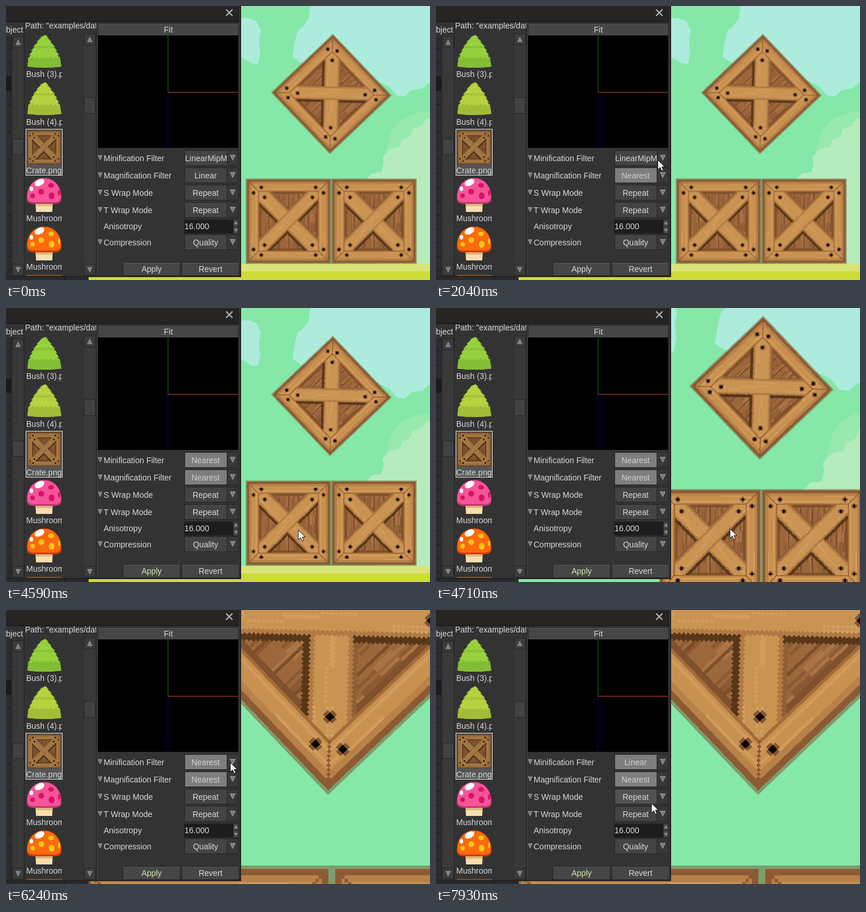
Recreate the animation shown at these times as an HTML page with a canvas. Size 734 by 475 pixels, loop 8000 ms.

```html
<!DOCTYPE html>
<html lang="en">
<head>
<meta charset="utf-8">
<title>Texture filter panel</title>
<style>
html, body { margin: 0; width: 100%; height: 100%; overflow: hidden; background: #222; }
canvas, svg.layer { position: absolute; left: 0; top: 0; display: block; }
#thumb { left: 36px; top: 215px; filter: brightness(.8); }
text { font: 14px "Liberation Sans", Arial, sans-serif; fill: #d8d8d8; }
.mid { text-anchor: middle; }
.off { display: none; }
</style>
</head>
<body>
<canvas id="scene" width="734" height="475"></canvas>
<svg class="layer" id="panel" width="734" height="475"></svg>
<canvas id="thumb" width="60" height="60"></canvas>
<svg class="layer" id="top" width="734" height="475"></svg>
<script>
const LOOP = 8000;
const $ = id => document.getElementById(id);

// ---------- small drawing helpers ----------
const rect = (x, y, w, h, fill, extra = '') =>
  `<rect x="${x}" y="${y}" width="${w}" height="${h}" fill="${fill}" ${extra}/>`;
const box = (x, y, w, h, fill, extra = '') =>
  rect(x + .5, y + .5, w - 1, h - 1, fill, `stroke="#262626" ${extra}`);
const text = (x, cy, s, extra = '') => `<text x="${x}" y="${cy + 5}" ${extra}>${s}</text>`;
const label = (x, cy, w, s) =>
  `<svg x="${x}" y="${cy - 10}" width="${w}" height="20">${text(0, 10, s)}</svg>`;
const arrow = (x, y, w, h, up) => {
  const s = up ? -1 : 1;
  return `<path d="M${x - w} ${y - h * s}h${2 * w}L${x} ${y + h * s}z" fill="#7c7c7c" stroke="#a8a8a8" stroke-width=".8"/>`;
};
const button = (x, y, w, h, s, id) =>
  box(x, y, w, h, '#464646') + rect(x + 1, y + 1, w - 2, 1, '#565656') +
  text(x + w / 2, y + h / 2, s, `class="mid" id="${id}"`);
const ellipse = (x, y, rx, ry, fill) =>
  `<ellipse cx="${x}" cy="${y}" rx="${rx}" ry="${ry}" fill="${fill}"/>`;

function scrollbar(x, y0, y1, thumbY, thumbH) {
  return rect(x, y0, 20, y1 - y0, '#393939') +
    box(x, y0, 20, 20, '#3c3c3c') + arrow(x + 10, y0 + 10, 4, 4, true) +
    box(x, y1 - 20, 20, 20, '#3c3c3c') + arrow(x + 10, y1 - 10, 4, 4) +
    box(x, thumbY, 20, thumbH, '#414141');
}

// a leafy dome with a darker, ragged lower layer
function bush(y, light, dark) {
  const left = [], right = [];
  for (let i = 0; i <= 6; i++) {
    const w = 8 + 21 * Math.sin(i * Math.PI / 12), py = y + 5 + i * 7.6;
    left.push(`L${66 - w} ${py}l3 -.5`);
    right.unshift(`L${63 + w} ${py - .5}l3 .5`);
  }
  const base = `L37 ${y + 55}Q66 ${y + 59} 96 ${y + 55}`;
  const rag = (cy, w) => {
    let d = `M${66 - w} ${cy}`;
    for (let i = 0; i < 7; i++) d += `l${w / 7} ${3 + i % 2}l${w / 7} ${-3 - (i + 1) % 2}`;
    return d;
  };
  return `<path d="M68 ${y}l-4 2${left.join('')}${base}${right.join('')}z" fill="${light}"/>` +
    `<path d="${rag(y + 38, 27)}L96 ${y + 55}Q66 ${y + 59} 37 ${y + 55}z" fill="${dark}"/>` +
    `<path d="${rag(y + 20, 18)}" fill="none" stroke="${dark}" stroke-width="1.5"/>`;
}

function mushroom(y, cap, spot, rim) {
  return `<path d="M51 ${y + 42}h30l-1 17h-28z" fill="#f6dfae"/>` +
    `<path d="M51 ${y + 44}h30l-1 5h-28z" fill="#dcb77c"/>` +
    `<path d="M36 ${y + 34}C36 ${y + 13} 50 ${y} 66 ${y}S96 ${y + 13} 96 ${y + 34}Q97 ${y + 45} 84 ${y + 45}H48Q35 ${y + 45} 36 ${y + 34}z" fill="${rim}"/>` +
    `<path d="M37 ${y + 33}C37 ${y + 13} 50 ${y + 1} 66 ${y + 1}S95 ${y + 13} 95 ${y + 33}Q95 ${y + 42} 84 ${y + 42}H48Q37 ${y + 42} 37 ${y + 33}z" fill="${cap}"/>` +
    ellipse(78, y + 13, 5, 4, spot) + ellipse(61, y + 24, 5, 5, spot) + ellipse(79, y + 31, 5, 6, spot) +
    ellipse(46, y + 31, 4, 4, spot) + ellipse(92, y + 26, 2, 5, spot) +
    `<ellipse cx="58" cy="${y + 8}" rx="9" ry="5.5" fill="#fff" transform="rotate(-28 58 ${y + 8})"/>` +
    ellipse(44, y + 19, 3, 4, '#fff');
}

// ---------- panel ----------
const rows = [
  ['Minification Filter', 264, 'LinearMipMapLinear', 'min'],
  ['Magnification Filter', 294, 'Linear', 'mag'],
  ['S Wrap Mode', 324, 'Repeat', 'wrapS'],
  ['T Wrap Mode', 354, 'Repeat', 'wrapT'],
  ['Compression', 410, 'Quality', 'comp']
];

function buildPanel() {
  let s = rect(0, 0, 407, 470, '#333') + rect(0, 0, 407, 27, '#262523') + rect(0, 26, 407, 2, '#1d1d1d') +
    '<path d="M381 6l11 11M392 6l-11 11" stroke="#b4b4b4" stroke-width="2.2"/>';

  // cropped list on the left edge
  s += rect(0, 52, 10, 417, '#2d2d2d') + rect(0, 122, 10, 24, '#1b1b1b');
  for (let y = 74; y < 468; y += 24) s += rect(0, y, 10, 1, '#1a1a1a');
  s += rect(9, 52, 1, 417, '#1f1f1f') + label(0, 41, 30, 'bject') + scrollbar(11, 53, 467, 230, 28);
  s += rect(31, 28, 1, 441, '#222');

  // asset list
  s += label(33, 34, 124, 'Path: "examples/data/') + scrollbar(135, 48, 467, 158, 29);
  s += bush(50, '#96d03c', '#82bd36') + label(35, 118, 62, 'Bush (3).png');
  s += bush(132, '#b6d23f', '#a2bd38') + label(35, 201, 62, 'Bush (4).png');
  s += rect(34.5, 213.5, 63, 80, '#555', 'stroke="#dcdcdc"') + label(35, 285, 62, 'Crate.png');
  s += mushroom(298, '#f5549a', '#d81260', '#c2386f') + label(35, 368, 62, 'Mushroom_1.png');
  s += mushroom(382, '#fb6a0c', '#fbc41c', '#d03c08') + label(35, 452, 62, 'Mushroom_2.png');
  s += rect(36, 466, 61, 3, '#7d512c');

  // preview
  s += rect(156, 28, 1, 441, '#1f1f1f') + rect(157, 28, 2, 441, '#3d3d3d');
  s += button(159, 30, 244, 22, 'Fit', 'fit') + rect(159, 51, 243, 195, '#000') +
    rect(280, 51, 1, 98, '#0a7a0a') + rect(280, 150, 1, 96, '#00007c') + rect(280, 149, 122, 1, '#c04030');

  // properties
  for (const [name, cy, value, id] of rows) {
    s += arrow(163, cy - 1, 3.5, 4) + label(169, cy, name === 'Compression' ? 82 : 130, name);
    s += box(309, cy - 14, 74, 27, '#444', `id="${id}Box"`) +
      `<svg x="309" y="${cy - 13}" width="73" height="26"><text id="${id}" x="36.5" y="18" class="mid">${value}</text></svg>` +
      box(382, cy - 14, 21, 27, '#383838') + arrow(392.5, cy - 1, 4.5, 4.5);
  }
  s += label(169, 382, 130, 'Anisotropy') + box(308, 370, 86, 25, '#1d1d1d') + text(309, 382, '16.000') +
    box(393, 370, 10, 13, '#484848') + box(393, 382, 10, 13, '#484848') +
    arrow(398, 376, 2.5, 2, true) + arrow(398, 389, 2.5, 2);
  s += button(202, 444, 100, 24, 'Apply', 'apply') + button(304, 444, 100, 24, 'Revert', 'revert');
  s += rect(404, 0, 1, 470, '#3a3a3a') + rect(405, 0, 2, 470, '#232323') + rect(0, 468, 407, 2, '#222');
  s += rect(0, 470, 143, 5, '#2a2a2a') + rect(101, 470, 1, 5, '#111');
  $('panel').innerHTML = s;
}

function popup(id, y, items) {
  let s = box(309, y, 95, 480 - y, '#303030');
  items.forEach((name, i) => {
    const iy = y + 5 + i * 26;
    const mid = name.length < 9;
    s += box(313, iy, 86, 26, '#3e3e3e', 'class="item"') +
      `<svg x="314" y="${iy}" width="84" height="26"><text x="${mid ? 42 : 0}" y="18"${mid ? ' class="mid"' : ''}>${name}</text></svg>`;
  });
  return `<g id="${id}" class="off">${s}</g>`;
}

buildPanel();
$('top').innerHTML =
  popup('magList', 308, ['Nearest', 'Linear']) +
  popup('minList', 278, ['Nearest', 'NearestMipMapNearest', 'NearestMipMapLinear',
    'Linear', 'LinearMipMapNearest', 'LinearMipMapLinear']) +
  '<path id="cursor" d="M0 0V16.5L4 13L6.6 19L9.4 17.8L6.8 12H12z" fill="#fff" stroke="#111" stroke-width="1"/>';

// ---------- crate texture ----------
const N = 77;
const noise = (x, y) => {
  const v = Math.sin(x * 12.9898 + y * 78.233) * 43758.5453;
  return v - Math.floor(v);
};

function texel(x, y) {
  const m = N - 1, d = Math.min(x, y, m - x, m - y);
  const a = x + y - m, b = y - x;
  if (d < 1) return 'rgba(123, 80, 45, .5)';
  if (d < 3) return '#8d5b33';
  if (d < 12) {
    if (Math.abs(a) < 1 || Math.abs(b) < 1) return '#8d5b33';
    if (d > 10) return '#a36c3a';
    if (d < 5) return '#b78148';
    const along = (d === x || d === m - x) ? y : x;
    return d === 9 || noise(d, along >> 4) > .85 ? '#d29a5c' : '#c8914f';
  }
  const plank = (k, edge, along) => k > edge || k < -7 ? '#b07a44'
    : noise(k, along >> 4) > .86 ? '#d39c5f' : '#c99452';
  if (a > -10 && a < 8) return plank(a, 5, b + 90);
  if (Math.abs(b) < 10) return plank(b, 7, a + 90);
  if ((a > 0 && a < 11) || (b > 0 && b < 13)) return '#583719';
  if (a > -12 && a < 0 || b > -12 && b < 0) return '#8f5f36';
  if (d < 14) return '#7f512c';
  if (x % 9 === 2) return '#7c4e2b';
  const n = noise(x, y >> 3);
  return n > .8 ? '#aa7446' : n < .2 ? '#8b5933' : '#9c673b';
}

function makeCrate() {
  const c = document.createElement('canvas');
  c.width = c.height = N;
  const g = c.getContext('2d');
  for (let y = 0; y < N; y++) for (let x = 0; x < N; x++) {
    g.fillStyle = texel(x, y);
    g.fillRect(x, y, 1, 1);
  }
  const nail = (x, y) => {
    g.fillStyle = '#855530';
    g.fillRect(x - 1, y, 4, 2);
    g.fillRect(x, y - 1, 2, 4);
    g.fillStyle = '#0c0805';
    g.fillRect(x, y, 2, 2);
  };
  const far = v => N - 2 - v;
  for (const [x, y] of [[6, 12], [13, 7], [16, 16]]) {
    nail(x, y); nail(far(x), y); nail(x, far(y)); nail(far(x), far(y));
  }
  return c;
}
const crate = makeCrate();

// ---------- scene ----------
const SIDE = 148;
const ctx = $('scene').getContext('2d');
const thumb = $('thumb').getContext('2d');
const scenery = [
  ['#adecdc', 'M400 22L420 21L434 27L441 42L438 60L440 82L436 101L424 99L414 92L400 88z'],
  ['#adecdc', 'M527 0L524 22L514 36L505 42L500 62L496 88L520 104L560 108L640 128L664 140L676 155L690 157L702 146L720 143L734 132L760 130V0z'],
  ['#98e9ae', 'M655 260L668 215L684 198L700 190L716 184L740 182V447H655z'],
  ['#b6ecbd', 'M622 302L634 290L650 288L654 272L652 262L664 248L682 244L686 232L700 226L704 214L720 208L728 196L760 190V447H640z']
].map(([fill, d]) => [fill, new Path2D(d)]);

function drawScene(zoom, nearest) {
  ctx.setTransform(zoom, 0, 0, zoom, 562.5 * (1 - zoom), 224.2 * (1 - zoom));
  ctx.fillStyle = '#85e8a8';
  ctx.fillRect(0, 0, 800, 500);
  for (const [fill, path] of scenery) {
    ctx.fillStyle = fill;
    ctx.fill(path);
  }
  ctx.fillStyle = '#d9e478';
  ctx.fillRect(0, 447, 800, 14);
  ctx.fillStyle = '#cddc39';
  ctx.fillRect(0, 460, 800, 40);
  ctx.imageSmoothingEnabled = !nearest;
  ctx.drawImage(crate, 415, 299, SIDE, SIDE);
  ctx.drawImage(crate, 563, 299, SIDE, SIDE);
  ctx.translate(563.3, 152.5);
  ctx.rotate(46.4 * Math.PI / 180);
  ctx.drawImage(crate, -SIDE / 2, -SIDE / 2, SIDE, SIDE);

  thumb.clearRect(0, 0, 60, 60);
  thumb.imageSmoothingEnabled = !nearest;
  thumb.drawImage(crate, 0, 0, 60, 60);
}

// ---------- timeline ----------
const path = [ // time, x, y
  [100, 514, 427], [500, 392, 297], [1120, 392, 297], [1520, 381, 326], [1710, 381, 326],
  [2040, 384, 267], [2110, 386, 260], [2430, 386, 260], [2700, 370, 298], [2850, 370, 298],
  [3060, 308, 377], [3130, 293, 420], [3260, 250, 449], [3390, 270, 451], [3700, 270, 451],
  [4270, 510, 384], [4520, 510, 384], [4590, 506, 385], [4920, 514, 378], [5220, 514, 378],
  [5980, 390, 263], [6570, 386, 266], [6750, 386, 268], [7010, 377, 301], [7410, 372, 374],
  [7600, 372, 374], [7670, 372, 370], [7930, 373, 335], [8000, 373, 335]
];
const zoomTimes = [4660, 4720, 4790, 4850, 4920, 5220];

function cursorAt(t) {
  const i = Math.max(1, path.findIndex(p => p[0] > t));
  const [t0, x0, y0] = path[i - 1], [t1, x1, y1] = path[i];
  const k = Math.max(0, (t - t0) / (t1 - t0));
  return [x0 + (x1 - x0) * k, y0 + (y1 - y0) * k];
}

function setField(id, value, lit) {
  const el = $(id), long = value.length > 9;
  el.textContent = value;
  el.setAttribute('x', long ? 1 : 36.5);
  el.style.textAnchor = long ? 'start' : 'middle';
  el.style.fill = lit ? '#cfcfcf' : '';
  $(id + 'Box').style.fill = lit ? '#7e7e7e' : '';
}

function setList(id, open, hover) {
  $(id).classList.toggle('off', !open);
  $(id).querySelectorAll('.item').forEach((el, i) => { el.style.fill = i === hover ? '#535353' : ''; });
}

const within = (t, a, b) => t >= a && t < b;

function render(t) {
  const steps = zoomTimes.filter(z => t >= z).length;
  drawScene(Math.pow(2.93, steps / 6), t >= 3580);

  const [x, y] = cursorAt(t);
  $('cursor').setAttribute('transform', `translate(${x} ${y})`);
  $('cursor').classList.toggle('off', t < 100);

  setField('min', t < 2850 ? 'LinearMipMapLinear' : t < 7670 ? 'Nearest' : 'Linear', t >= 2850);
  setField('mag', t < 1780 ? 'Linear' : 'Nearest', t >= 1780);
  setList('magList', within(t, 820, 1780), t >= 1710 ? 0 : -1);
  setList('minList', within(t, 2360, 2850) || within(t, 6430, 7670), Math.floor((y - 283) / 26));
  $('wrapSBox').style.fill = t >= 7860 ? '#525252' : '';
  $('apply').style.fill = t >= 3580 ? '#cfe6b4' : '';
}

function tick() {
  render(performance.now() % LOOP);
  requestAnimationFrame(tick);
}
tick();
</script>
</body>
</html>
```
